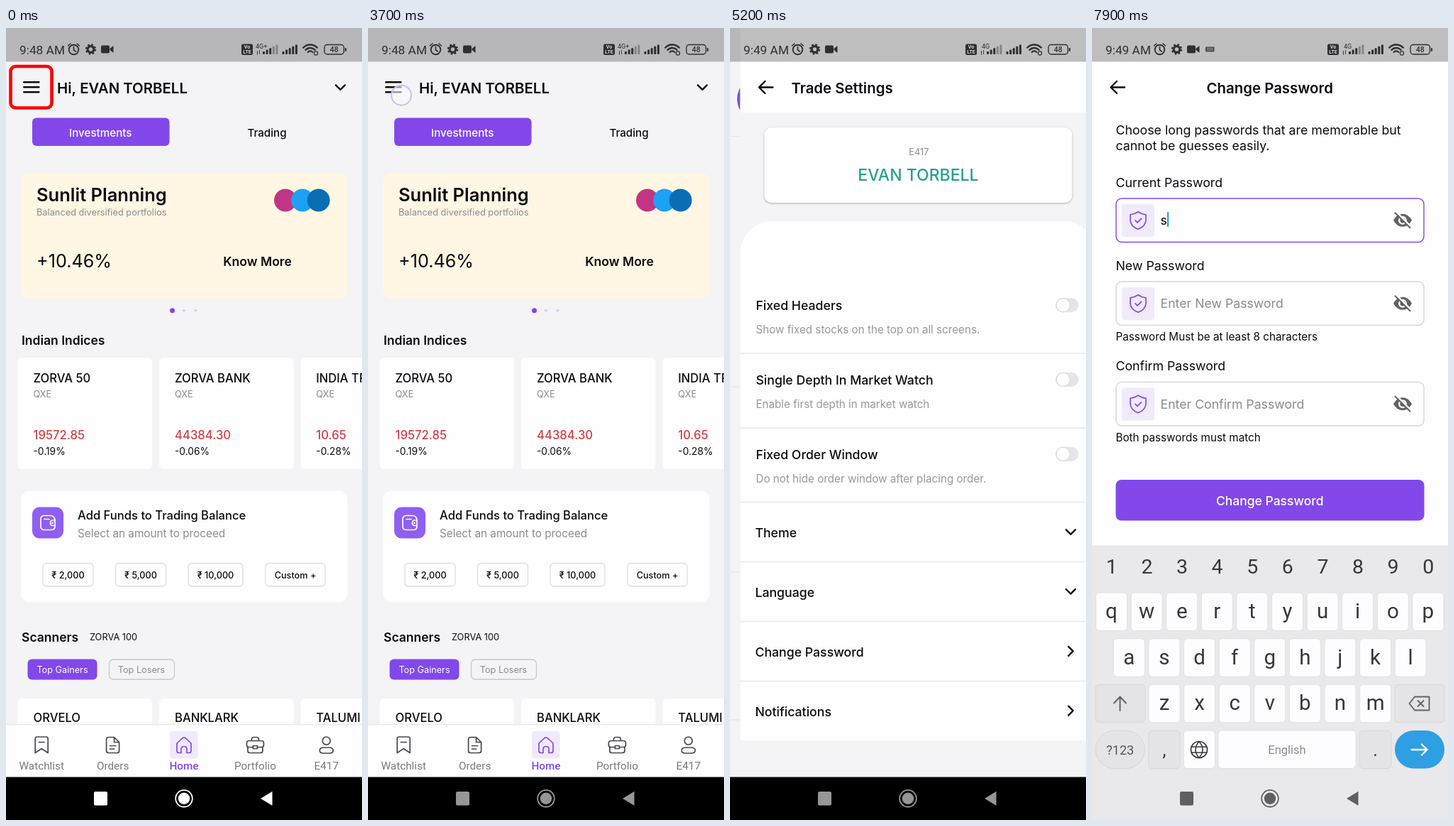
These frames come from a looping animation (502x1115 px, 8 s). An HTML page with a canvas:

```html
<!DOCTYPE html>
<html lang="en">
<head>
<meta charset="utf-8">
<title>Change password walkthrough</title>
<style>
html, body { margin: 0; width: 100%; height: 100%; overflow: hidden; background: #000; }
canvas { display: block; width: 100vw; height: 100vh; }
</style>
</head>
<body>
<canvas id="stage"></canvas>
<script>
const W = 502, H = 1115, LOOP = 8000, STEP = 100;
const canvas = document.getElementById('stage');
const c = canvas.getContext('2d');
const dpr = window.devicePixelRatio || 1;
canvas.width = Math.round(W * dpr);
canvas.height = Math.round(H * dpr);

const PURPLE = '#8248ea', INK = '#0c0b0e', GREY = '#8c8b90', WHITE = '#fefdff';
const BG = '#f4f3f6', LINE = '#e8e7ea', RED = '#fe0000', LOSS = '#cf4146';
const USER = 'EVAN TORBELL', CODE = 'E417';
const INTER = 'Inter, sans-serif', ROBOTO = 'Roboto, sans-serif';

const clamp = v => Math.max(0, Math.min(1, v));
const between = (t, a, b) => clamp((t - a) / (b - a));
const easeOut = (p, k) => 1 - Math.pow(1 - p, k);

// Text is placed by the middle of its capitals.
function text(s, x, y, size, weight = 400, color = INK, align = 'left', family = INTER) {
  c.font = `${weight} ${size}px ${family}`;
  c.fillStyle = color;
  c.textAlign = align;
  c.fillText(s, x, y + size * 0.362);
}

function box(x, y, w, h, r, fill, stroke, lw = 1.3) {
  c.beginPath();
  c.roundRect(x, y, w, h, r);
  if (fill) { c.fillStyle = fill; c.fill(); }
  if (stroke) { c.strokeStyle = stroke; c.lineWidth = lw; c.stroke(); }
}

function disc(x, y, r, fill, stroke, lw = 1.5) {
  c.beginPath();
  c.arc(x, y, r, 0, Math.PI * 2);
  if (fill) { c.fillStyle = fill; c.fill(); }
  if (stroke) { c.strokeStyle = stroke; c.lineWidth = lw; c.stroke(); }
}

// Draws an SVG path around (x, y).
function icon(d, x, y, color, lw) {
  const path = new Path2D(d);
  c.save();
  c.translate(x, y);
  c.lineCap = c.lineJoin = 'round';
  if (lw) { c.strokeStyle = color; c.lineWidth = lw; c.stroke(path); }
  else { c.fillStyle = color; c.fill(path, 'evenodd'); }
  c.restore();
}

function rule(y) {
  c.fillStyle = LINE;
  c.fillRect(0, y - 0.75, W, 1.5);
}

function chevron(x, y, down) {
  icon(down ? 'M-6.5 -3.2L0 3.3L6.5 -3.2' : 'M-3.2 -6.5L3.3 0L-3.2 6.5', x, y, INK, 2.4);
}

function backArrow() {
  icon('M10 0H-9M-1 -8.5L-9.5 0L-1 8.5', 36, 83.5, INK, 2.4);
}

function arrow(x, y, angle) {
  c.save();
  c.translate(x, y);
  c.rotate(angle);
  const g = c.createLinearGradient(0, -27, 0, 27);
  g.addColorStop(0, '#c9161b');
  g.addColorStop(0.35, '#f2282d');
  g.addColorStop(0.6, '#d9191e');
  g.addColorStop(1, '#a30e12');
  c.fillStyle = g;
  c.fill(new Path2D('M0 0L47 -27L44 -12.5H88V12.5H44L47 27Z'));
  c.restore();
}

function statusBar(t) {
  const ink = '#2f2e30';
  c.fillStyle = 'rgba(0,0,0,.25)';
  c.fillRect(0, 0, W, 47.5);
  text(t < 3900 ? '9:48 AM' : '9:49 AM', 19, 30.5, 17.3, 400, ink, 'left', ROBOTO);

  disc(95.5, 30.5, 6.8, null, ink, 1.9);
  icon('M0 -4V.5L3 2.5M-8 -5.5L-4.5 -8.5M8 -5.5L4.5 -8.5', 95.5, 30.5, ink, 1.6);
  disc(119.5, 30, 4.3, null, ink, 3.2);
  c.setLineDash([2.6, 2.5]);
  disc(119.5, 30, 6.5, null, ink, 2.4);
  c.setLineDash([]);
  box(134, 24.5, 12, 11, 2, ink);
  icon('M0 -1L5 -5V5L0 1Z', 146.5, 30, ink);
  if (t >= 7400) {
    box(160, 26.5, 12.5, 7, 1, '#4b4a4c');
    icon('M-4 -1.3H4M-4 1H4', 166.2, 30, '#b9b8ba', 0.8);
  }

  box(332, 22.5, 16, 15.5, 2.5, ink);
  text('Vo', 340, 26.8, 7, 700, '#d5d4d6', 'center', ROBOTO);
  text('LTE', 340, 33.5, 7, 700, '#d5d4d6', 'center', ROBOTO);
  text(t < 4900 ? '4G+' : '4G', t < 4900 ? 352 : 355, 25.5, 9, 400, ink, 'left', ROBOTO);
  icon('M-1.5 3V-2M1.5 -3V2', 356, 34.5, ink, 0.9);
  for (let i = 0; i < 5; i++) {
    const h = 4 + i * 2.4;
    box(362 + i * 4.6, 37 - h, 3, h, 1, i < 3 ? ink : '#858486');
    box(389.5 + i * 4.6, 37 - h, 3, h, 1, ink);
  }
  c.lineCap = 'round';
  for (const r of [4.5, 9, 13.5]) {
    c.beginPath();
    c.arc(429, 37, r, -Math.PI * 0.76, -Math.PI * 0.24);
    c.strokeStyle = ink;
    c.lineWidth = 2.3;
    c.stroke();
  }
  c.lineCap = 'butt';
  disc(437, 35.5, 2.6, null, ink, 1.2);
  box(449, 23.5, 27.5, 13.5, 4, null, ink, 1.4);
  box(478, 28, 2, 5, 1, ink);
  text('48', 462.7, 30.4, 10.5, 500, ink, 'center', ROBOTO);
}

function systemBar(t, keys) {
  if (!keys) {
    c.fillStyle = '#000';
    c.fillRect(0, 1054.5, W, 61);
  }
  const v = Math.round(255 - 105 * between(t, 1100, 1500));
  const ink = keys ? '#5f5e62' : `rgb(${v},${v},${v})`;
  box(124, 1075, 19, 19.5, 2, ink);
  disc(251, 1084.7, 11.8, null, ink, 1.8);
  disc(251, 1084.7, 8.2, ink);
  icon('M-8.5 0L8 -10V10Z', 367.5, 1084.7, ink);
}

function indexCard(x, name, value, change) {
  box(x, 464, 189.5, 157, 6, WHITE);
  text(name, x + 22, 492.5, 16.6, 500);
  text('QXE', x + 22, 515.5, 12.8, 400, GREY);
  text(value, x + 22, 573, 16.7, 500, LOSS);
  text(change, x + 22, 596.5, 13.8);
}

function home() {
  c.fillStyle = BG;
  c.fillRect(0, 0, W, 1055);
  icon('M-10.6 -7H10.6M-10.6 0H10.6M-10.6 7H10.6', 35.8, 83.2, INK, 2.4);
  text('Hi, ' + USER, 72, 84.5, 20.4, 600);
  chevron(471.5, 83.6, true);

  box(37, 126.5, 193.5, 39.5, 6, PURPLE);
  text('Investments', 133.3, 147, 15.2, 500, '#fff', 'center');
  text('Trading', 368, 147, 15.2, 500, INK, 'center');

  box(21, 204, 460.5, 177, 12, '#fff6e4');
  text('Sunlit Planning', 43, 235, 25.5, 600);
  text('Balanced diversified portfolios', 43, 259, 12.8, 400, GREY);
  disc(394, 242.5, 16, '#c13584');
  disc(418, 242.5, 16, '#1da1f2');
  disc(440.7, 242.5, 16, '#0a6eb4');
  text('+10.46%', 43, 328, 25.2);
  text('Know More', 354.5, 329, 17.6, 600, INK, 'center');
  disc(234.5, 397.7, 3.5, PURPLE);
  disc(251, 397.7, 1.8, '#d3c8ea');
  disc(267.5, 397.7, 1.8, '#d3c8ea');

  text('Indian Indices', 22, 439.5, 17.5, 600);
  indexCard(16.5, 'ZORVA 50', '19572.85', '-0.19%');
  indexCard(216, 'ZORVA BANK', '44384.30', '-0.06%');
  indexCard(415.3, 'INDIA TRIM', '10.65', '-0.28%');

  box(21, 651.5, 460.5, 157, 12, WHITE);
  box(37, 674.5, 44, 44, 10, '#8f5ff4');
  icon('M-5 -10H4Q9 -10 10 -4V5Q10 10 5 10H-5Q-10 10 -10 5V-5Q-10 -10 -5 -10ZM10 -3.5H6A4 4 0 0 0 6 4H10M-5 -5H2', 59, 696.5, '#fff', 1.7);
  disc(65.5, 696.7, 1.2, '#fff');
  text('Add Funds to Trading Balance', 101, 686, 16.6, 500);
  text('Select an amount to proceed', 101, 711, 15.3, 400, GREY);
  [['₹ 2,000', 52, 71], ['₹ 5,000', 154.5, 71], ['₹ 10,000', 257, 77], ['Custom +', 366, 84]].forEach(([s, x, w]) => {
    box(x, 753.5, w, 32.5, 5, null, '#dedde2');
    text(s, x + w / 2, 770.5, 12.7, 500, INK, 'center');
  });

  text('Scanners', 22, 857.5, 17.5, 600);
  text('ZORVA 100', 118, 857, 12.8);
  box(30.5, 888.5, 98, 29, 6, PURPLE);
  text('Top Gainers', 79.5, 903.5, 12.7, 400, '#fff', 'center');
  box(145.5, 889, 92, 28, 6, null, '#c9c8cd');
  text('Top Losers', 191, 903.5, 12.7, 400, GREY, 'center');
  [['ORVELO', 16.5], ['BANKLARK', 216], ['TALUMI', 415.3]].forEach(([s, x]) => {
    box(x, 944, 189.5, 60, 6, WHITE);
    text(s, x + 22, 971, 16.6, 500);
  });
  tabs();
}

function tabs() {
  c.fillStyle = WHITE;
  c.fillRect(0, 980, W, 75);
  rule(980.5);
  box(231, 990, 39.5, 38.5, 4, '#f1eafc');
  const doc = 'M-6 -11H2L9 -4V8Q9 11 6 11H-6Q-9 11 -9 8V-8Q-9 -11 -6 -11ZM2 -11V-4H9M-4 1H4M-4 5.5H2';
  const mark = 'M-6.5 -11.5H6.5Q9 -11.5 9 -9V11L0 5L-9 11V-9Q-9 -11.5 -6.5 -11.5ZM-4 -4H4';
  const house = 'M-10 -2.5L-2 -10Q0 -11.5 2 -10L10 -2.5V8Q10 11 7 11H4V5Q4 2 0 2Q-4 2 -4 5V11H-7Q-10 11 -10 8Z';
  const bag = 'M-3 3H-9Q-12 3 -12 0V-3Q-12 -6 -9 -6H9Q12 -6 12 -3V0Q12 3 9 3H3M-10.5 3V8Q-10.5 11 -7.5 11H7.5Q10.5 11 10.5 8V3M-5 -6V-8Q-5 -11 -2 -11H2Q5 -11 5 -8V-6M-3 1H3V5H-3Z';
  const person = 'M0 -11.5A5.5 5.5 0 0 1 0 -.5A5.5 5.5 0 0 1 0 -11.5ZM-4 3.5H4Q9.5 3.5 9.5 7.5Q9.5 11.5 4 11.5H-4Q-9.5 11.5 -9.5 7.5Q-9.5 3.5 -4 3.5Z';
  [[mark, 'Watchlist'], [doc, 'Orders'], [house, 'Home'], [bag, 'Portfolio'], [person, CODE]].forEach(([d, s], i) => {
    const x = 50.2 + i * 100.4, on = i === 2;
    icon(d, x, 1009.5, on ? PURPLE : '#48474b', 1.7);
    text(s, x, 1038, 15.3, on ? 500 : 400, on ? PURPLE : '#7a797e', 'center', ROBOTO);
  });
}

function menuItem(s, y, soon) {
  icon('M-1 -8V1.5H8.5A9.2 9.2 0 1 1 -1 -8ZM2.2 -9.5A8 8 0 0 1 9.7 -2H2.2Z', 32, y, '#d8495a', 1.6);
  text(s, 54, y + 0.5, 16.35, 400, '#222125');
  if (!soon) return;
  box(272.5, y - 16, 108.5, 32, 5, '#f0d5d6');
  text('Coming soon', 326.7, y + 0.5, 15.15, 400, '#222125', 'center');
}

function drawer(p) {
  const w = 401.5;
  c.fillStyle = `rgba(0,0,0,${0.54 * p})`;
  c.fillRect(0, 0, W, 1055);
  c.save();
  c.translate(-w * (1 - p), 0);
  c.beginPath();
  c.rect(0, 0, w, 1055);
  c.clip();
  c.fillStyle = BG;
  c.fillRect(0, 0, w, 1055);
  disc(42, 100, 32, PURPLE);
  text(USER[0], 42, 100.5, 23, 600, '#fff', 'center');
  text(CODE, 85, 86, 15.5, 400, '#77767b');
  text(USER, 85, 116, 16.6, 400);
  [152.5, 505, 766, 974].forEach(rule);
  ['Funds', 'Trade Settings', 'Rewards & Referrals', 'About', 'External Apps', 'Link Family Accounts']
    .forEach((s, i) => menuItem(s, 190.8 + i * 53.5, i === 5));
  text('Support', 21, 548, 16.4, 500);
  ['Support Portal', 'User Manual', 'Contact'].forEach((s, i) => menuItem(s, 604 + i * 57.4, true));
  text('Reports', 21, 808.5, 16.4, 500);
  ['P&L', 'Tradebook'].forEach((s, i) => menuItem(s, 864.5 + i * 52.5, true));
  text('Logout', 200.5, 1007, 16.4, 500, PURPLE, 'center');
  text('Build v1.0.0', 200.3, 1039.5, 16.2, 400, '#222125', 'center');
  c.restore();
}

function settings() {
  c.fillStyle = BG;
  c.fillRect(0, 0, W, 1055);
  c.fillStyle = WHITE;
  c.fillRect(0, 0, W, 119);
  backArrow();
  text('Trade Settings', 72, 84.5, 20.4, 600);
  c.save();
  c.shadowColor = 'rgba(0,0,0,.3)';
  c.shadowBlur = 3 * dpr;
  c.shadowOffsetY = dpr;
  box(34, 140, 434, 106, 10, WHITE);
  c.restore();
  text(CODE, 252, 174, 12.8, 400, GREY, 'center');
  text(USER, 251, 206.5, 23, 500, '#26a28e', 'center');

  box(0, 272, W, 731, [45, 45, 0, 0], WHITE);
  [458, 563, 667.5, 751.5, 835.5, 919.5].forEach(rule);
  [['Fixed Headers', 'Show fixed stocks on the top on all screens.'],
   ['Single Depth In Market Watch', 'Enable first depth in market watch'],
   ['Fixed Order Window', 'Do not hide order window after placing order.']].forEach(([a, b], i) => {
    const y = 390.3 + i * 104.7;
    text(a, 22, y + 0.5, 17.7, 500);
    text(b, 22, y + 34.5, 15.2, 400, '#98979c');
    box(444.5, y - 10, 32.5, 20, 10, '#e5e4e7');
    disc(455.3, y, 9.6, '#fff', '#d3d2d6', 1);
  });
  ['Theme', 'Language', 'Change Password', 'Notifications'].forEach((s, i) => {
    const y = 710 + i * 83.9;
    text(s, 21, y + 0.5, 17.7, 500);
    chevron(466, y - 0.5, i < 2);
  });
}

function field(y, value, hint, active) {
  box(34, y, 434, 61.5, 8, null, active ? PURPLE : '#d6d5da', 1.4);
  box(42, y + 8, 46, 46, 4, '#f0eafa');
  const mid = y + 30.8;
  icon('M0 -12Q5 -8.5 11 -8V0Q10.5 8.5 0 12.5Q-10.5 8.5 -11 0V-8Q-5 -8.5 0 -12ZM-4 0L-1 3L4.5 -2.5', 65, mid, PURPLE, 1.7);
  text(value || hint, 96.5, mid, 17.7, 400, value ? INK : GREY);
  const eye = '#626166';
  icon('M-13 0Q-8 -9 0 -9Q8 -9 13 0Q8 9 0 9Q-8 9 -13 0ZM0 -6A6 6 0 0 0 0 6A6 6 0 0 0 0 -6Z', 438, mid, eye);
  disc(438, mid, 3.6, eye);
  icon('M-8.5 -11.5L12 9', 438, mid, WHITE, 2.6);
  icon('M-10.5 -10.5L10.5 10.5', 438, mid, eye, 2);
}

function passwordPage(t) {
  const focus = t >= 7200, typed = t >= 7800;
  c.fillStyle = WHITE;
  c.fillRect(0, 0, W, 1055);
  backArrow();
  text('Change Password', 250.7, 84.5, 20.4, 600, INK, 'center');
  text('Choose long passwords that are memorable but', 33.5, 143.5, 17.75);
  text('cannot be guesses easily.', 33.5, 165.5, 17.75);
  text('Current Password', 33.5, 217.5, 17.75);
  field(240, typed ? 's' : '', 'Enter Current Password', focus);
  if (focus) {
    c.fillStyle = '#2f9fe0';
    c.fillRect(typed ? 106 : 96, 259, 2.2, 21);
  }
  text('New Password', 33.5, 334.5, 17.75);
  field(357, '', 'Enter New Password');
  text('Password Must be at least 8 characters', 33.5, 434.5, 15.25);
  text('Confirm Password', 33.5, 476, 17.75);
  field(498.5, '', 'Enter Confirm Password');
  text('Both passwords must match', 33.5, 576.5, 15.25);
  box(33.5, 636, 435, 57.5, 8, PURPLE);
  text('Change Password', 250.7, 666, 17.5, 500, '#fff', 'center');
}

function keyboard(p) {
  const pitch = 49.6, ink = '#37363a', dim = '#e4e3e6', edge = '#d6d5d9';
  const key = (x, y, w, fill = '#fdfcfe', r = 5, line) => box(x, y, w, 53.5, r, fill, line || '#e0dfe3', 1);
  c.save();
  c.translate(0, 386 * (1 - p));
  c.fillStyle = '#e9e8eb';
  c.fillRect(0, 728.5, W, 400);
  [...'1234567890'].forEach((d, i) => text(d, 27.8 + i * pitch, 758, 28.5, 400, ink, 'center', ROBOTO));
  [['qwertyuiop', 5.5, 795], ['asdfghjkl', 30.3, 859.7], ['zxcvbnm', 80, 924.3]].forEach(([row, x0, y]) => {
    [...row].forEach((ch, i) => {
      const x = x0 + i * pitch;
      key(x, y, 44);
      text(ch, x + 22, y + 25.5, 29.5, 400, ink, 'center', ROBOTO);
    });
  });
  key(5, 924.3, 70, dim, 5, edge);
  icon('M0 10V-9M-8.5 -.5L0 -9.5L8.5 -.5', 39.5, 951, '#646368', 2);
  key(427, 924.3, 70, dim, 5, edge);
  icon('M-6.5 -9.5H14V9.5H-6.5L-14 0ZM-2 -4L6 4M6 -4L-2 4', 461.5, 951, '#646368', 1.9);

  const y = 989, mid = 1016;
  key(5, y, 69.5, dim, 26.7, edge);
  text('?123', 39.7, mid, 18, 400, '#57565a', 'center', ROBOTO);
  key(80, y, 44, dim, 5, edge);
  text(',', 102, mid, 25, 400, ink, 'center', ROBOTO);
  key(129.3, y, 44);
  disc(151, mid, 11.5, null, ink, 1.7);
  icon('M-10.5 -4H10.5M-10.5 4H10.5M0 -11.5Q-10 0 0 11.5Q10 0 0 -11.5', 151, mid, ink, 1.5);
  key(178, y, 194);
  text('English', 275, mid, 16.5, 400, GREY, 'center', ROBOTO);
  key(377, y, 45, dim, 5, edge);
  text('.', 399.5, mid, 25, 400, ink, 'center', ROBOTO);
  box(427, y, 70, 53.5, 26.7, '#2f9fe3');
  icon('M-11 0H11M3.5 -7.5L11 0L3.5 7.5', 461.5, mid, '#fff', 2.3);
  c.restore();
}

// Slides a page in from the right.
function slideIn(page, t, start) {
  if (t < start) return;
  c.save();
  c.translate(W * (1 - easeOut(between(t, start, start + 340), 4)), 0);
  page(t);
  c.restore();
}

function draw(t) {
  c.setTransform(canvas.width / W, 0, 0, canvas.height / H, 0, 0);
  if (t < 5400) {
    home();
    const open = easeOut(between(t, 3750, 4100), 2.5);
    if (open > 0) drawer(open);
  }
  slideIn(settings, t, 5000);
  slideIn(passwordPage, t, 6800);

  if (t < 3700) box(6.5, 54, 58, 58.5, 7, null, RED, 4.6);
  else if (t < 3800) disc(47, 94.7, 14, 'rgba(250,250,255,.6)', '#c6c4e2', 2);
  if (t >= 4200 && t < 4800) {
    box(5.5, 213.5, 191, 70, 8, null, RED, 5);
    arrow(253.5, 246, 0);
  }
  if (t >= 5600 && t < 6700) {
    box(4, 829, 355.5, 90, 9, null, RED, 6);
    arrow(138.3, 633.5, -Math.PI / 2);
  }

  statusBar(t);
  const keys = easeOut(between(t, 7200, 7500), 2.5);
  if (keys > 0) keyboard(keys);
  systemBar(t, keys > 0.2);
}

function tick() {
  const t = performance.now() % LOOP;
  draw(Math.floor(t / STEP) * STEP);
  requestAnimationFrame(tick);
}
tick();
</script>
</body>
</html>
```
